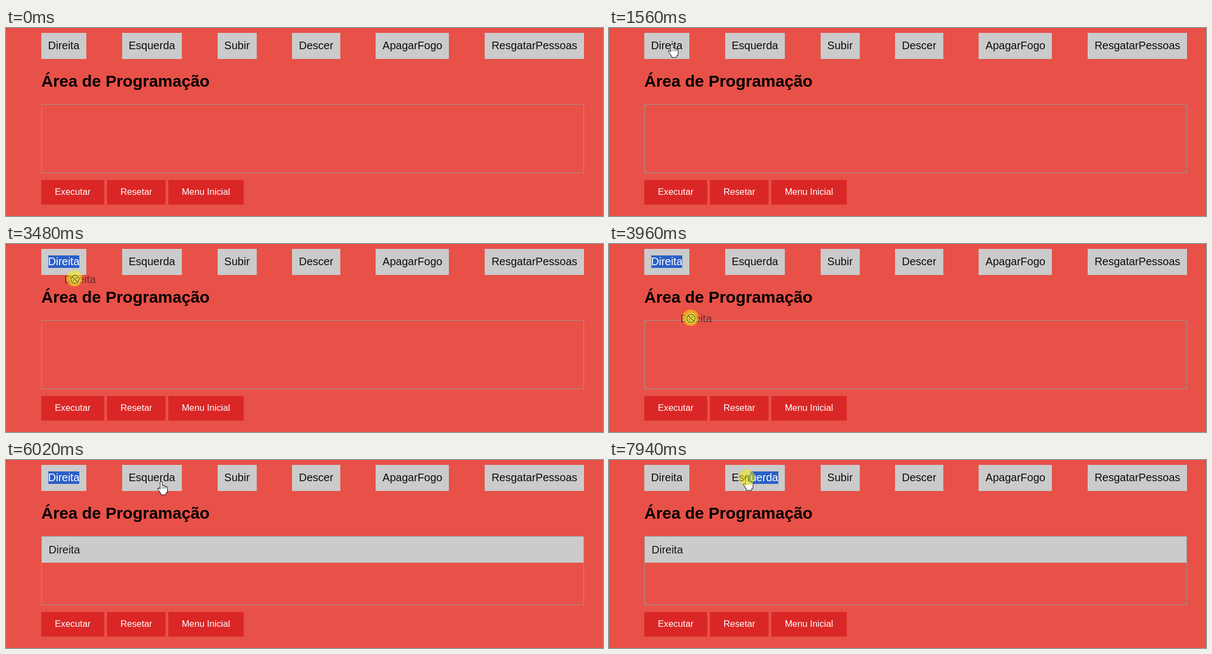
An HTML page with a canvas for the animation above (8000 ms loop, 1100 by 346 pixels).

```html
<!DOCTYPE html>
<html lang="pt">
<head>
<meta charset="utf-8">
<title>Área de Programação</title>
<style>
html, body { margin: 0; width: 1100px; height: 346px; overflow: hidden; background: #e85148; }
canvas { display: block; }
</style>
</head>
<body>
<canvas id="stage" width="1100" height="346"></canvas>
<script>
const ctx = document.getElementById('stage').getContext('2d');
const LOOP = 8000, STEP = 69.2, EASE = 1.4;
const FONT = '"Liberation Sans", Arial, sans-serif';
const LABEL = '20px ' + FONT;
const SELECT = 1690, GRAB = 3330, DRAG = 3390, DROP = 4980, CLEAR = 6840, RESELECT = 7655;

// pointer moves: start, end, target and an optional bend
const moves = [
  { from: 170, to: 378, at: [670, 238] },
  { from: 378, to: 930, at: [155, 40], bend: [412, 30] },
  { from: 1010, to: 1285, at: [133, 33] },
  { from: 1430, to: 1568, at: [116, 30] },
  { from: 1568, to: 1705, at: [130, 31] },
  { from: 1705, to: 2160, at: [112, 57], bend: [85, 30] },
  { from: 2240, to: 2930, at: [98, 33], bend: [111, 61] },
  { from: 3070, to: 3140, at: [97, 31] },
  { from: 3340, to: 3755, at: [164, 106] },
  { from: 3755, to: 4100, at: [145, 147] },
  { from: 4170, to: 4380, at: [144, 154] },
  { from: 5260, to: 6020, at: [286, 40] },
  { from: 6090, to: 6430, at: [300, 33] },
  { from: 6570, to: 6850, at: [348, 37] },
  { from: 7124, to: 7330, at: [320, 28] },
  { from: 7400, to: 7460, at: [312, 30] },
  { from: 7660, to: 7937, at: [254, 32] }
];
const ENTRY = [986, 330];

ctx.font = LABEL;
const blocks = ['Direita', 'Esquerda', 'Subir', 'Descer', 'ApagarFogo', 'ResgatarPessoas']
  .map(name => ({ name, w: ctx.measureText(name).width + 25 }));
const gap = (1000 - blocks.reduce((s, b) => s + b.w, 0)) / (blocks.length - 1);
blocks.reduce((x, b) => { b.x = x; return x + b.w + gap; }, 65);

function text(str, x, y, font, color) {
  ctx.font = font;
  ctx.fillStyle = color;
  ctx.fillText(str, x, y);
}

function rect(x, y, w, h, color) {
  ctx.fillStyle = color;
  ctx.fillRect(x, y, w, h);
}

// the pointer is sampled at a fixed rate within each move
function pointerAt(time) {
  const i = moves.findLastIndex(m => m.from <= time);
  if (i < 0) return ENTRY;
  const { from, to, at, bend } = moves[i];
  const start = i ? moves[i - 1].at : ENTRY;
  const passed = Math.floor((time - from + 9) / STEP) * STEP;
  const k = 1 - (1 - Math.min(1, passed / (to - from))) ** EASE;
  return at.map((end, n) => {
    const mid = bend ? bend[n] : (start[n] + end) / 2;
    return (1 - k) ** 2 * start[n] + 2 * k * (1 - k) * mid + k * k * end;
  });
}

// nearest character edge to a pointer position
function snap(block, x) {
  ctx.font = LABEL;
  const left = block.x + 12.5;
  let best = left;
  for (let i = 1; i <= block.name.length; i++) {
    const edge = left + ctx.measureText(block.name.slice(0, i)).width;
    if (Math.abs(edge - x) < Math.abs(best - x)) best = edge;
  }
  return best;
}

function select(block, from) {
  const end = Math.round(block.x + block.w - 12.5);
  from = Math.round(from);
  if (from >= end) return;
  ctx.save();
  ctx.beginPath();
  ctx.rect(from, 21, end - from, 23);
  ctx.clip();
  rect(from, 21, end - from, 23, '#2b5fc6');
  text(block.name, block.x + 12.5, 39, LABEL, '#fff');
  ctx.restore();
}

function page(dropped) {
  rect(0, 0, 1100, 346, '#e85148');
  for (const b of blocks) {
    const x = Math.round(b.x);
    rect(x, 9, Math.round(b.x + b.w) - x, 48, '#cbcbcb');
    text(b.name, b.x + 12.5, 39, LABEL, '#0c0c0c');
  }
  text('Área de Programação', 65, 108, 'bold 30px ' + FONT, '#000');
  ctx.strokeStyle = '#999';
  ctx.lineWidth = 1;
  ctx.strokeRect(65.5, 140.5, 999, 126);
  if (dropped) {
    rect(66, 141, 998, 48, '#cbcbcb');
    text('Direita', 78.5, 172, LABEL, '#19151f');
  }
  let x = 65;
  for (const name of ['Executar', 'Resetar', 'Menu Inicial']) {
    ctx.font = '16.667px ' + FONT;
    const w = Math.round(ctx.measureText(name).width + 50);
    rect(x, 280, w, 45, '#da2726');
    text(name, x + 25, 307, ctx.font, '#fff');
    x += w + 5;
  }
}

function outline(shape) {
  ctx.strokeStyle = '#111';
  ctx.lineWidth = 2;
  ctx.stroke(shape);
  ctx.fillStyle = '#fff';
  ctx.fill(shape);
}

const arrowShape = new Path2D('M1 1V15L4 12.5 6.3 17.6 8 17 6 11.5H10.5Z');

const handShape = new Path2D('M-6 13L-4 12 0 16V22Z');
[0, 7, 8, 9.5].forEach((top, i) => handShape.roundRect(-1.5 + 3.1 * i, top, 3, 20 - top, 1.5));
handShape.rect(-1, 12, 11, 7);
handShape.roundRect(-0.5, 17, 9, 6.5, 1);

const cursors = {
  arrow() {
    outline(arrowShape);
  },
  hand() {
    outline(handShape);
    for (const x of [1.5, 4.6, 7.7]) rect(x, 9, 0.7, 4, '#111');
  },
  beam() {
    rect(-3, -9, 7, 1, '#222');
    rect(0, -9, 1, 18, '#222');
    rect(-3, 8, 7, 1, '#222');
  },
  deny() {
    const sign = new Path2D('M-4.4 -4.4L6.4 6.4');
    sign.moveTo(8.6, 1);
    sign.arc(1, 1, 7.6, 0, 7);
    for (const [color, w] of [['#fff', 4.6], ['#111', 2.2]]) {
      ctx.strokeStyle = color;
      ctx.lineWidth = w;
      ctx.stroke(sign);
    }
  },
  move() {
    cursors.arrow();
    ctx.lineWidth = 1;
    ctx.setLineDash([1, 1]);
    ctx.strokeRect(0.5, 20.5, 11, 7);
  }
};

function cursorKind(time, x, y) {
  if (time >= DRAG && time < DROP) return y < 141 ? 'deny' : 'move';
  if (y > 8 && y < 59 && blocks.some(b => x >= b.x && x <= b.x + b.w)) return 'hand';
  if (time >= DROP && y > 140 && y < 189) return 'hand';
  if (x > 65 && x < 375 && y > 80 && y < 116) return 'beam';
  return 'arrow';
}

function pressed(time) {
  const within = (a, b) => time >= a && time < b;
  return within(SELECT, 2230) || within(GRAB, DROP) || within(CLEAR, 7130) || time >= RESELECT;
}

function render(time) {
  page(time >= DROP);
  const [x, y] = pointerAt(time);
  if (time >= SELECT && time < CLEAR) select(blocks[0], snap(blocks[0], time < 2000 ? x + 2 : 0));
  if (time >= RESELECT) select(blocks[1], snap(blocks[1], x + 2));
  if (time < moves[0].from) return;
  if (time >= DRAG && time < DROP) text('Direita', x - 18.5, y + 8, LABEL, 'rgba(20,20,20,.6)');
  ctx.save();
  ctx.translate(Math.round(x), Math.round(y));
  cursors[cursorKind(time, x, y)]();
  ctx.restore();
  if (pressed(time)) {
    ctx.fillStyle = 'rgba(248,240,0,.5)';
    ctx.beginPath();
    ctx.arc(x, y, 15, 0, 7);
    ctx.fill();
  }
}

function tick(now) {
  render(now % LOOP);
  requestAnimationFrame(tick);
}
render(0);
requestAnimationFrame(tick);
</script>
</body>
</html>
```
